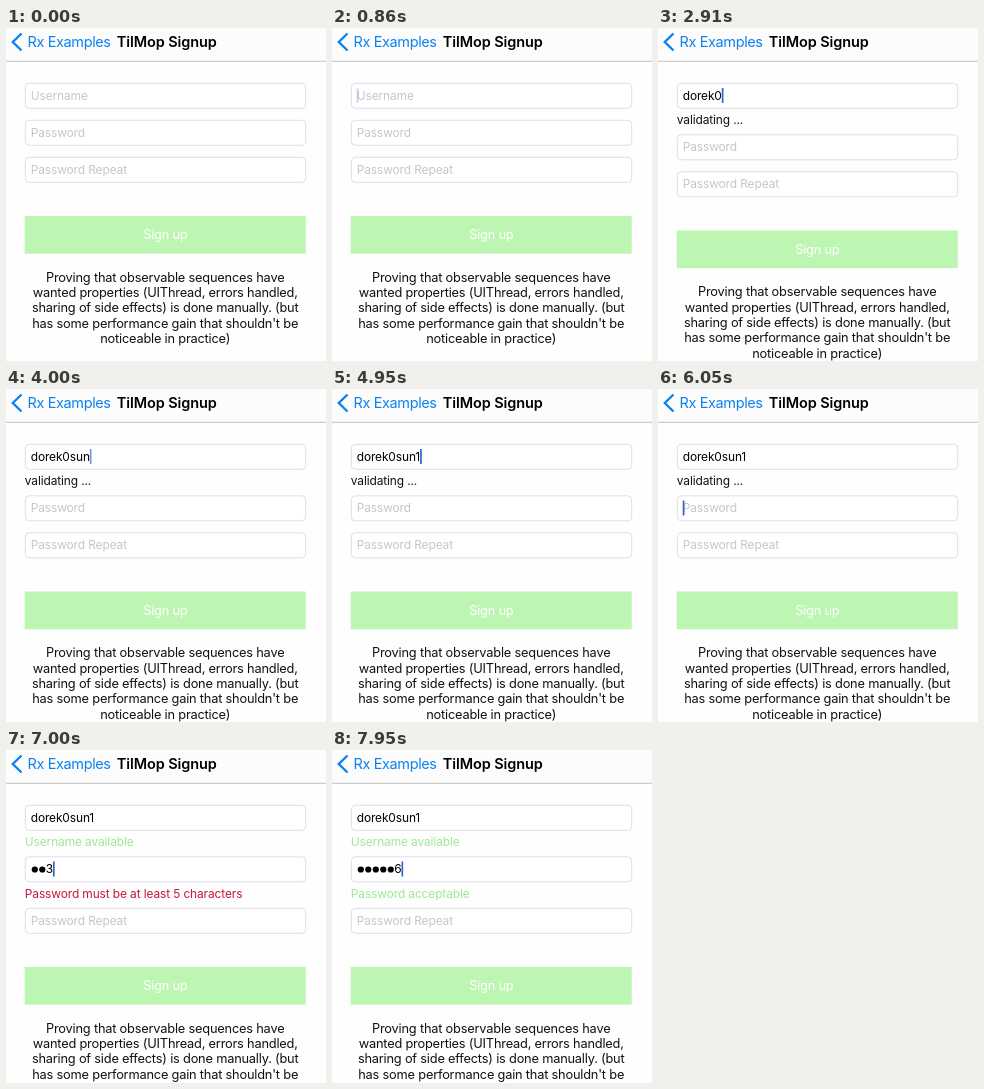
Animation of 320x333 px, one loop 8 s. Source, as an HTML page with a canvas:

```html
<!DOCTYPE html>
<html lang="en">
<head>
<meta charset="utf-8">
<title>Signup form</title>
<style>
  html, body { margin: 0; width: 100%; height: 100%; overflow: hidden; background: #fefefe; }
  canvas { display: block; width: 320px; height: 333px; }
</style>
</head>
<body>
<canvas id="stage"></canvas>
<script>
const W = 320, H = 333, LOOP = 8000;
const canvas = document.getElementById('stage');
const ctx = canvas.getContext('2d');
const scale = window.devicePixelRatio || 1;
canvas.width = W * scale;
canvas.height = H * scale;

const BLUE = '#0c82f0', CARET = '#3563cf', GREEN = '#9fe895', RED = '#c4183c';
const STATUS_H = 14.5;
const FONTS = {
  nav: ['400 14.5px', -0.38],
  title: ['600 14.5px', -0.1],
  body: ['400 12.8px', -0.2],
  small: ['400 11.95px', -0.12]
};

const NAME = 'dorek0sun1';
const PASS = '123456';
const TAP_NAME = 250, TAP_PASS = 5650;
const nameKeys = [910, 1100, 1280, 1470, 1650, 2450, 2950, 3200, 3450, 4750];
const passKeys = [6430, 6690, 6950, 7280, 7590, 7910];

const VALIDATING = ['validating ...', '#111'];
const AVAILABLE = ['Username available', GREEN];
const nameStatus = [
  [910, VALIDATING],
  [4150, ['Username already taken', RED]],
  [4750, VALIDATING],
  [5350, AVAILABLE],
  [TAP_PASS, VALIDATING],
  [6400, AVAILABLE]
];

const NOTE = [
  'Proving that observable sequences have',
  'wanted properties (UIThread, errors handled,',
  'sharing of side effects) is done manually. (but',
  "has some performance gain that shouldn't be",
  'noticeable in practice)'
];

const countPast = (times, t) => times.filter(k => k <= t).length;

function setFont(key) {
  const [font, spacing] = FONTS[key];
  ctx.font = font + ' Inter, Roboto, sans-serif';
  ctx.letterSpacing = spacing + 'px';
}

function text(str, x, y, key, color, align = 'left') {
  setFont(key);
  ctx.fillStyle = color;
  ctx.textAlign = align;
  ctx.fillText(str, x, y);
}

function textWidth(str) {
  setFont('small');
  return ctx.measureText(str).width;
}

// The caret stays solid after each key press, then fades out and in.
function caretAlpha(age) {
  const p = age % 1000;
  if (p < 500) return 1;
  if (p < 650) return (650 - p) / 150;
  if (p < 850) return 0;
  return (p - 850) / 150;
}

function caret(x, y, t, tap, keys) {
  const last = Math.max(tap, ...keys.filter(k => k <= t));
  ctx.globalAlpha = caretAlpha(t - last);
  ctx.fillStyle = CARET;
  ctx.fillRect(x, y + 5, 1.7, 15);
  ctx.globalAlpha = 1;
}

function field(y, placeholder) {
  ctx.beginPath();
  ctx.roundRect(19.3, y + 0.3, 280.4, 25, 4);
  ctx.fillStyle = '#fff';
  ctx.fill();
  ctx.strokeStyle = '#dedee5';
  ctx.lineWidth = 1;
  ctx.stroke();
  if (placeholder) text(placeholder, 24.7, y + 16.8, 'small', '#c6c6cb');
}

function navBar() {
  ctx.fillStyle = '#fcfcfc';
  ctx.fillRect(0, 0, W, 33);
  ctx.fillStyle = '#b9b9bb';
  ctx.fillRect(0, 32.8, W, 0.9);
  ctx.beginPath();
  ctx.moveTo(15.5, 5.5);
  ctx.lineTo(6.8, 14);
  ctx.lineTo(15.5, 22.5);
  ctx.strokeStyle = BLUE;
  ctx.lineWidth = 2.4;
  ctx.stroke();
  text('Rx Examples', 21.5, 19, 'nav', BLUE);
  text('TilMop Signup', 110.8, 19, 'title', '#000');
}

function password(y, count) {
  if (!count) return 24.7;
  const pitch = 7.5;
  ctx.fillStyle = '#000';
  for (let i = 0; i < count - 1; i++) {
    ctx.beginPath();
    ctx.arc(28.8 + i * pitch, y + 13, 3.1, 0, Math.PI * 2);
    ctx.fill();
  }
  const x = 24.7 + (count - 1) * pitch, digit = PASS[count - 1];
  text(digit, x, y + 16.8, 'small', '#000');
  return x + textWidth(digit);
}

function draw(t) {
  ctx.setTransform(scale, 0, 0, scale, 0, 0);
  ctx.fillStyle = '#fefefe';
  ctx.fillRect(0, 0, W, H);
  navBar();

  const typed = NAME.slice(0, countPast(nameKeys, t));
  const passCount = countPast(passKeys, t);
  const status = nameStatus.filter(s => s[0] <= t).pop();
  const onPass = t >= TAP_PASS;

  let y = 55;
  field(y, typed ? '' : 'Username');
  text(typed, 24.7, y + 16.8, 'small', '#000');
  if (t >= TAP_NAME && !onPass) caret(24.7 + textWidth(typed), y, t, TAP_NAME, nameKeys);

  y += 37;
  if (status) {
    text(status[1][0], 18.8, y + 4.2, 'small', status[1][1]);
    y += STATUS_H;
  }
  field(y, passCount ? '' : 'Password');
  const passEnd = password(y, passCount);
  if (onPass) caret(passEnd, y, t, TAP_PASS, passKeys);

  y += 37;
  if (passCount) {
    const ok = passCount >= 5;
    text(ok ? 'Password acceptable' : 'Password must be at least 5 characters',
      18.8, y + 4.2, 'small', ok ? GREEN : RED);
    y += STATUS_H;
  }
  field(y, 'Password Repeat');

  y += 59;
  ctx.fillStyle = '#bdf5b2';
  ctx.fillRect(18.7, y, 281, 37.7);
  text('Sign up', 159.3, y + 23.4, 'body', '#fff', 'center');
  NOTE.forEach((line, i) => text(line, 159.2, y + 65.8 + i * 15.3, 'body', '#111', 'center'));
}

function tick(now) {
  draw(now % LOOP);
  requestAnimationFrame(tick);
}
draw(0);
requestAnimationFrame(tick);
</script>
</body>
</html>
```
